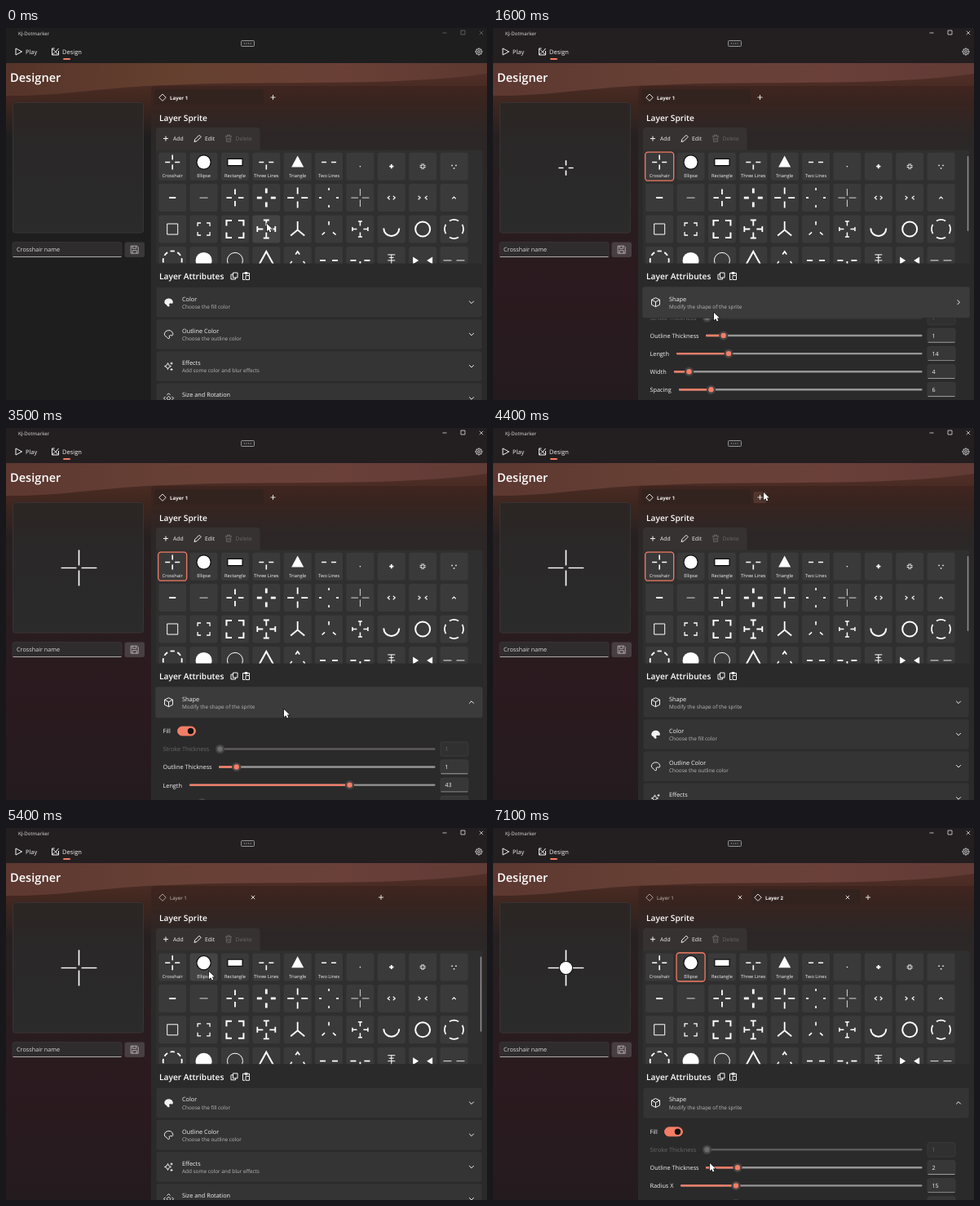
Recreate the animation shown at these times as an HTML page with a canvas. Size 590 by 456 pixels, loop 7.2 s.

```html
<!DOCTYPE html>
<html lang="en">
<meta charset="utf-8">
<title>Designer</title>
<style>
html, body { margin: 0; width: 100%; height: 100%; overflow: hidden; background: #1f1e1f }
canvas { display: block }
</style>
<canvas id="stage" width="590" height="456"></canvas>
<script>
const c = document.getElementById('stage').getContext('2d');
const ACCENT = '#f47d66', WHITE = '#f4f4f4', GREY = '#b4b2b2', DIM = '#686767';
const OPEN_1 = 1500, CLOSE = 3500, ADD = 5000, PICK = 700, PICK_2 = 5800, OPEN_2 = 6700;

// time, x, y of the pointer tip
const POINTER = [
  [0, 320, 240], [100, 319, 239], [500, 205, 172], [900, 205, 172], [1400, 268, 345],
  [1600, 271, 349], [1800, 275, 365], [2100, 289, 435], [2300, 289, 435], [2900, 421, 435],
  [3100, 421, 435], [3200, 421, 404], [3300, 353, 340], [3400, 353, 340], [3500, 341, 345],
  [3700, 341, 345], [4300, 328, 81], [4400, 332, 79], [5000, 332, 79], [5400, 249, 176],
  [5800, 249, 174], [6300, 249, 335], [6700, 250, 360], [7100, 266, 411]];

const cross = (a, b) => `M0-${b}V-${a}M0 ${a}V${b}M-${b} 0H-${a}M${a} 0H${b}`;
const circle = r => `M${r} 0A${r} ${r} 0 1 1 ${-r} 0A${r} ${r} 0 1 1 ${r} 0Z`;
const brackets = (r, k) =>
  `M${-r} ${-k}V${-r}H${-k}M${k} ${-r}H${r}V${-k}M${r} ${k}V${r}H${k}M${-k} ${r}H${-r}V${k}`;
const tees = (a, b, k) => cross(a, b) +
  `M${-k} ${-b}H${k}M${-k} ${b}H${k}M${-b} ${-k}V${k}M${b} ${-k}V${k}`;
const arcs = (r, n, gap) => Array.from({ length: n }, (_, i) => {
  const at = a => `${r * Math.cos(a)} ${r * Math.sin(a)}`, a = (i + .5) * 2 * Math.PI / n;
  return `M${at(a + gap)}A${r} ${r} 0 0 1 ${at(a + 2 * Math.PI / n - gap)}`;
}).join('');
const dashes = 'M-9 0H-3M3 0H9';

// path and line width, 0 means filled
const SPRITES = [
  [cross(3, 9), 1.6], [circle(8), 0], ['M-8.5-3.5H8.5V3.5H-8.5Z', 0], [dashes + 'M0 3V9', 1.6],
  ['M0-8L7.5 6H-7.5Z', 0], [dashes, 1.6], [circle(.8), 0], ['M-2.6 0H2.6M0-2.6V2.6', 1.8],
  ['M-1-3.5V-1H-3.5M1-3.5V-1H3.5M-1 3.5V1H-3.5M1 3.5V1H3.5', 1],
  ['M-3.2-2h1.5v1.5h-1.5zM1.7-2h1.5v1.5h-1.5zM-.7 1.5h1.5v1.5h-1.5z', 0],
  ['M-4 0H4', 2], ['M-5 0H5', .8], [cross(4, 10.5), 1.8], [cross(5.5, 11.5), 2.8],
  [cross(4.5, 12.5), 1.8], [cross(9, 12), 1.6], [cross(2.5, 11), .8],
  ['M-2-2.2L-4.5 0L-2 2.2M2-2.2L4.5 0L2 2.2', 1.2], ['M-5.5-2.2L-3 0L-5.5 2.2M5.5-2.2L3 0L5.5 2.2', 1.2],
  ['M-2.2 1.2L0-1L2.2 1.2', 1.2],
  ['M-6.5-6.5H6.5V6.5H-6.5Z', 1], [brackets(7.5, 3.5), 1.3], [brackets(10.5, 4), 2],
  [tees(4, 11, 3.5), 1.8], ['M0-9.5V1L-8.5 8M0 1L8.5 8', 1.8], ['M0-9.5V-5M-8.5 7L-5 3.8M8.5 7L5 3.8', 1.6],
  [tees(4, 9.5, 2.5), 1.5], ['M-9.5-1A9.5 9.5 0 0 0 9.5-1', 2], [circle(9), 2], [arcs(11.5, 4, .28), 1.7],
  [arcs(11.5, 8, .16), 1.8], [circle(10), 0], [circle(9.5), 1], ['M0-11L11 9H-11Z', 2],
  ['M-2.5-7.5L0-11L2.5-7.5M-9 4L-7 1M9 4L7 1', 1.7], ['M-11 0H-4M4 0H11', 1.8],
  ['M-12 0H-5M5 0H12M0 1V9', 1.8], ['M-4.5-7H4.5M0-7V8M-3-3.5H3M-4.5 0H4.5', 1],
  ['M-12-4.5L-5 0L-12 4.5ZM12-4.5L5 0L12 4.5Z', 0], ['M-13 0H-3M3 0H13', .9]
];
const NAMES = ['Crosshair', 'Ellipse', 'Rectangle', 'Three Lines', 'Triangle', 'Two Lines'];

const PALETTE = 'M-5 1C-6-4 0-6 3-4C6-2 6 2 3.5 1.5C1 1 0 2 1 3.5C1.5 6-1 5.5-2 4C-3 2-4 3-5 1Z';
const SPOTS = 'M-2-1.5h.1M0-3h.1M2.5-2h.1M3.4.2h.1';
const CHEVRON = 'M-2.8-1.4L0 1.4L2.8-1.4', PLUS = 'M-3 0H3M0-3V3', CLOSE_X = 'M-2.2-2.2L2.2 2.2M2.2-2.2L-2.2 2.2';
const DIAMOND = 'M0-4.2L4.2 0L0 4.2L-4.2 0Z', PENCIL = 'M-4 4L-3.2 1L2-4.2L4.2-2L-1 3.2Z';
const SHAPE = ['Shape', 'Modify the shape of the sprite', 'M0-5.5L5-3V3L0 5.5L-5 3V-3ZM-5-3L0-.5L5-3M0-.5V5.5'];
const ATTRS = [
  ['Color', 'Choose the fill color', PALETTE],
  ['Outline Color', 'Choose the outline color', PALETTE + SPOTS],
  ['Effects', 'Add some color and blur effects',
    'M-1-4Q-.6-.6 3 0Q-.6.6-1 4Q-1.4.6-5 0Q-1.4-.6-1-4ZM3.5-5V-2M2-3.5H5M3.5 2.5V5.5M2 4H5'],
  ['Size and Rotation', 'Change the size and angle',
    'M0-2.5L2.5 0L0 2.5L-2.5 0ZM-2-4L0-6L2-4M-2 4L0 6L2 4M-4-2L-6 0L-4 2M4-2L6 0L4 2']
];

const clamp = v => Math.max(0, Math.min(1, v));
const ramp = (t, from, len) => clamp((t - from) / len);
const within = (t, a, b) => t >= a && t < b;

function box(x, y, w, h, fill, r = 3, line, lw = 1) {
  c.beginPath();
  c.roundRect(x, y, w, h, r);
  if (fill) { c.fillStyle = fill; c.fill(); }
  if (line) { c.strokeStyle = line; c.lineWidth = lw; c.stroke(); }
}
function text(s, x, y, size = 7.3, color = WHITE, weight = 400, align = 'left') {
  c.font = `${weight} ${size}px "Open Sans", "Noto Sans", sans-serif`;
  c.textAlign = align;
  c.fillStyle = color;
  c.fillText(s, x, y + size * .36);
}
function icon(path, x, y, lw = .9, color = WHITE, turn = 0) {
  const p = new Path2D(path);
  c.save();
  c.translate(x, y);
  c.rotate(turn);
  c.strokeStyle = c.fillStyle = color;
  c.lineWidth = lw;
  lw ? c.stroke(p) : c.fill(p);
  c.restore();
}
function disc(x, y, r, color) { icon(circle(r), x, y, 0, color); }
function shade(x0, y0, x1, y1, ...stops) {
  const g = c.createLinearGradient(x0, y0, x1, y1);
  stops.forEach(([at, color]) => g.addColorStop(at, color));
  return g;
}
function clipped(x, y, w, h, draw) {
  c.save();
  c.beginPath();
  c.rect(x, y, w, h);
  c.clip();
  draw();
  c.restore();
}
function pointerAt(t) {
  const i = POINTER.findLastIndex(k => k[0] <= t), a = POINTER[i], b = POINTER[i + 1] || a;
  const k = b === a ? 0 : (t - a[0]) / (b[0] - a[0]);
  return [a[1] + (b[1] - a[1]) * k, a[2] + (b[2] - a[2]) * k];
}

function backdrop(active) {
  box(0, 0, 590, 456, '#1f1e1f', 0);
  c.globalAlpha = active;
  box(0, 0, 590, 456, shade(0, 0, 0, 456, [0, '#231f20'], [.3, '#272021'], [.7, '#2b1a1f'], [1, '#241b1e']), 0);
  c.globalAlpha = 1;
  box(0, 43, 590, 92, shade(0, 43, 590, 43, [0, '#553429'], [.35, '#65402f'], [.7, '#6a4036'], [1, '#5c382f']), 0);
  c.globalAlpha = active * .35;
  box(0, 43, 590, 92, '#6a4140', 0);
  c.globalAlpha = 1;
  c.beginPath();
  c.moveTo(0, 83);
  c.bezierCurveTo(70, 84, 120, 72, 200, 70);
  c.bezierCurveTo(330, 64, 480, 72, 590, 56);
  c.lineTo(590, 136);
  c.lineTo(0, 136);
  c.fillStyle = shade(0, 60, 0, 134, [0, '#4f2e27'], [.4, '#40271f'], [1, active > .5 ? '#272021' : '#1f1e1f']);
  c.fill();
}

function header(active) {
  box(0, 0, 590, 43, active > .5 ? '#231f20' : '#1e1e1e', 0);
  text('KJ-Dotmarker', 15, 6.5, 6.1, '#e0dede');
  const tone = active > .5 ? '#dddada' : '#6c6a6a';
  icon('M-2.5 0H2.5', 538, 6, .8, tone);
  icon('M-2.5-2.5H2.5V2.5H-2.5Z', 560.5, 5.5, .8, tone);
  icon(CLOSE_X, 583, 6, .8, tone);
  box(288.5, 15.5, 16, 7, '#2b2a2a', 1, '#a09e9e', .9);
  icon('M-5 0h1M-2.5 0h1M0 0h1M2.5 0h1', 297, 19, 1, GREY);
  icon('M-3.5-4L4 0L-3.5 4Z', 15.5, 29, 1);
  text('Play', 24, 29.5, 7.4);
  icon('M-4-4V4H4V-1M-4 4L-1 1M4-4L0 1M-3-3L3 3M-4-4H-1', 60.5, 29, 1);
  text('Design', 69, 29.5, 7.5);
  box(70, 37, 9, 2, ACCENT, 1);
  icon(arcs(4, 8, .14) + circle(3.4) + circle(1.4), 580, 29, .9, '#d0cece');
}

function preview(t, active, length) {
  text('Designer', 5, 60.5, 14.6, '#fff', 600);
  box(8.5, 91.5, 160, 159.5, shade(0, 91, 0, 251, [0, '#2c2523'], [.35, '#2a2828'], [1, '#2b2b2b']), 3, '#383434');
  const end = 3 + length * .44;
  if (t >= PICK) {
    icon(cross(2.5, end + .5), 89.5, 171.5, 2.8, '#1a1a1a');
    icon(cross(3, end), 89.5, 171.5, 1.7, '#fff');
  }
  if (t >= PICK_2) {
    disc(89.5, 171.5, 8.6, '#111');
    disc(89.5, 171.5, 7.6, '#fff');
  }
  box(8, 262.5, 134, 18.5, '#2f2c2d', 2.5, '#3a3738', .8);
  box(8.5, 280, 133, 1, '#a9a6a7', 0);
  text('Crosshair name', 13, 271.5, 7.25, '#dcdada');
  box(145.5, 262.5, 24.5, 18.5, active > .5 ? '#483f42' : '#3a3839', 2.5);
  icon('M-4.5-4.5H3L4.5-3V4.5H-4.5ZM-2.5-4.5V-1.5H2V-4.5M-2.5 4.5V1H2.5V4.5', 157.7, 271.7, .9, '#bbb7b8');
}

function tabs(t, added, [px, py]) {
  box(178, 71, 420, 400, shade(0, 71, 0, 215, [0, '#40251f'], [.15, '#38241f'], [.4, '#2c2726'], [1, '#2b2a2a']), [5, 0, 0, 0]);
  const x = added ? 317 : 182, seen = added ? ramp(t, 5400, 300) : 1;
  c.globalAlpha = seen;
  box(x, 75, 134, 19, '#33231f', [4, 4, 0, 0]);
  if (added) {
    icon(DIAMOND, 325, 85.2);
    text('Layer 2', 334, 85.5, 6.1, WHITE, 700);
    icon(CLOSE_X, 435, 85, .9);
  }
  c.globalAlpha = 1;
  icon(DIAMOND, 192, 85.2, .9, added ? GREY : WHITE);
  text('Layer 1', 201, 85.5, 6.15, added ? '#c9c4c3' : WHITE, added ? 400 : 700);
  if (added) icon(CLOSE_X, 303, 85, .9);
  if (!added && Math.abs(px - 328) < 10 && Math.abs(py - 84) < 9) box(319.5, 78, 16, 14, '#51372f', 2);
  icon(PLUS, added ? 460 : 327.5, 85, .9);
}

function sprites(t, selected, [px, py]) {
  text('Layer Sprite', 188, 110, 10.2, '#fff', 600);
  box(184, 122, 127.5, 30, '#363231', [4, 4, 0, 0]);
  icon(PLUS, 196, 135.5, 1);
  text('Add', 205, 136, 6.8);
  icon(PENCIL, 235, 135.5, 1);
  text('Edit', 244, 136, 6.8);
  icon('M-4-3H4M-3-3L-2.4 4H2.4L3-3M-1.5-3V-4.5H1.5V-3M-1-1V2.5M1-1V2.5', 273, 135.5, .9, DIM);
  text('Delete', 281.5, 136, 6.7, DIM);
  box(184, 149.5, 400.5, 139, '#302f2f', [0, 4, 0, 0]);
  clipped(184, 149, 401, 139.5, () => SPRITES.forEach(([path, lw], i) => {
    const x = 204.2 + i % 10 * 38.37, y = 169.7 + Math.floor(i / 10) * 38.4;
    const hover = Math.abs(px - x) < 17 && Math.abs(py - y) < 17;
    box(x - 17, y - 17, 34, 34, hover ? '#454444' : '#3b3a3a', 3);
    if (i === selected) box(x - 17.5, y - 17.5, 35, 35, null, 3.5, ACCENT, 1.3);
    const iy = NAMES[i] ? y - 5.2 : y;
    if (i === 1 || i === 2) icon(path, x, iy, 2.4, '#0c0c0c');
    icon(path, x, iy, lw, '#fff');
    if (NAMES[i]) text(NAMES[i], x, y + 11, 5.7, WHITE, 400, 'center');
  }));
  if (within(t, 200, 2000) || within(t, 4000, 6300)) box(581.8, 157, 1.5, 92, '#929090', 1);
}

function expander([title, hint, path], y, filled, turn, [px, py]) {
  const hover = px > 184 && py > y && py < y + 43 ? 1 : 0;
  box(184 - hover, y - hover / 2, 400 + 2 * hover, 37.5 + hover, hover ? '#3c3b3b' : '#353434', 3, '#2a2929', .6);
  icon(path, 199.5, y + 18.7, filled ? 0 : 1);
  if (filled) icon(SPOTS, 199.5, y + 18.7, 1.3, '#353434');
  text(title, 216, y + 14.5);
  text(hint, 216, y + 24, 6.4, '#bab8b8');
  icon(CHEVRON, 571, y + 18.7, 1, WHITE, turn);
}

function slider(label, y, start, thumb, value, off, init) {
  text(label, 192.5, y + .3, 7.3, off ? DIM : WHITE);
  const grey = off && !init;
  box(start, y - 1.2, 526.5 - start, 2.4, grey ? '#5c5b5b' : '#979595', 1);
  if (!off) box(start, y - 1.2, thumb - start, 2.4, ACCENT, 1);
  disc(thumb, y, 5.6, '#454444');
  disc(thumb, y, 3.2, grey ? '#6c6b6b' : ACCENT);
  box(533, y - 8.7, 34, 17.4, grey ? '#313030' : '#383737', 2.5, '#403f3f', .7);
  if (!grey) box(533.5, y + 7.8, 33, .9, '#9a9898', 0);
  text(value, 538.5, y + .3, 7.2, grey ? DIM : WHITE);
}

function shapeControls(y, second, length, init) {
  text('Fill', 192.5, y + .3);
  box(210.5, y - 5.5, 22, 11, init ? '#2a2929' : ACCENT, 5.5, init ? '#a3a1a1' : ACCENT, .9);
  disc(init ? 216.5 : 226.5, y, 3.7, init ? '#d0cece' : '#111');
  const rows = second
    ? [['Outline Thickness', 261, 300, 2], ['Radius X', 230, 298, 15], ['Radius Y', 230, 298, 15]]
    : [['Outline Thickness', 261, 282.7, 1], ['Length', 225, 225 + length * 4.57, Math.round(length)],
       ['Width', 222, 240.5, 4], ['Spacing', 228, 267.5, 6]];
  slider('Stroke Thickness', y + 22, 262, 262.5, 1, true, init);
  rows.forEach(([label, start, thumb, value], i) => slider(label, y + 44 + i * 22.1, start, thumb, value));
}

function attributes(t, selected, length, pointer) {
  text('Layer Attributes', 188, 304.5, 10.2, '#fff', 600);
  icon('M-1.5-4H4V2H-1.5ZM-1.5-2H-4V4H1.5V2', 280, 304, 1);
  icon('M-1.5 4.5H-4V-3.5H4V-1M-1.5-4.5H1.5V-2.5H-1.5ZM-.5-.5H4V4.5H-.5Z', 294.5, 304, 1);
  const top = 317.5, step = 39.2, shaped = selected >= 0;
  const second = t >= OPEN_2, since = t - (second ? OPEN_2 : OPEN_1);
  const open = second || within(t, OPEN_1, CLOSE + 200);
  const shift = shaped ? 1 - (1 - ramp(t, selected ? PICK_2 : PICK, 200)) ** 3 : 0;
  let turn = 0;
  if (open) {
    const closing = second ? 0 : ramp(t, CLOSE, 200);
    // the content shows once in place before it slides in from above
    const slide = since < 100 ? 0 : 130 * (1 - ramp(since, 0, 300)) ** 3;
    turn = -Math.PI * ramp(since, 0, 200) * (1 - closing);
    clipped(178, top + 37.5, 412, 140, () =>
      shapeControls(371.5 - slide - 130 * closing, second, length, since < 100));
  } else {
    ATTRS.forEach((a, i) => expander(a, top + (i + shift) * step, i === 0, 0, pointer));
  }
  if (shaped) {
    c.globalAlpha = shift;
    expander(SHAPE, top, false, turn, pointer);
    c.globalAlpha = 1;
  }
}

function draw(t) {
  const pointer = pointerAt(t), active = ramp(t, 0, 200), added = t >= ADD;
  const length = 14 + 29 * ramp(t, 2300, 600);
  const selected = t < PICK ? -1 : !added ? 0 : t < PICK_2 ? -1 : 1;
  backdrop(active);
  header(active);
  preview(t, active, length);
  tabs(t, added, pointer);
  c.save();
  if (added) c.translate(0, .8);
  sprites(t, selected, pointer);
  attributes(t, selected, length, pointer);
  c.restore();
  const arrow = 'M0 0V9.2L2.2 7.2L3.7 10.4L5.3 9.7L3.9 6.6H6.8Z';
  icon(arrow, ...pointer, 1.2, '#111');
  icon(arrow, ...pointer, 0, '#fff');
}

c.textRendering = 'geometricPrecision';
const began = performance.now();
function tick() {
  const t = (performance.now() - began) % 7200;
  draw(Math.floor(t / 100) * 100);
  requestAnimationFrame(tick);
}
tick();
</script>
</html>
```
